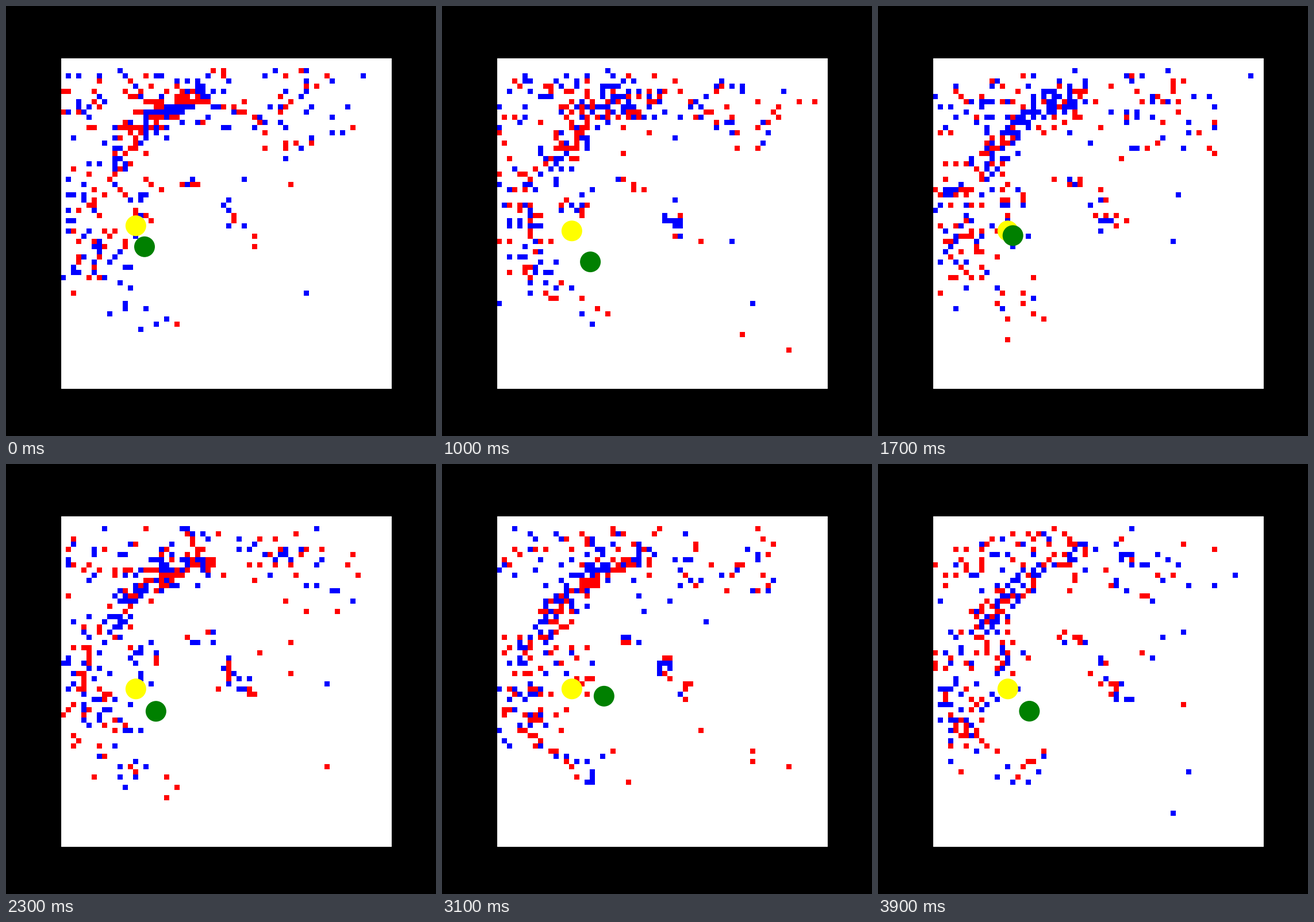
A matplotlib script that plays this animation: 748x748 px, repeating every 4000 ms.

```python
import numpy as np
import matplotlib.pyplot as plt
from matplotlib.animation import FuncAnimation
from matplotlib.patches import Circle

GRID = 64
TOP_ROW, LAST_ROW = 2, 61
STEPS = 40
WHITE, RED, BLUE = (255, 255, 255), (255, 0, 0), (0, 0, 255)


def arc(start, end):
    """Piece of the rounded outline, angles in degrees left of the top."""
    a = np.radians(np.linspace(start, end, 12))
    return np.column_stack([29 - 19 * np.sin(a), 24 - 16 * np.cos(a)])


# Path of (col, row) points, spread, mean event count, growth over the loop
BANDS = [
    (arc(0, 52), 1.7, 84, -0.25),
    (arc(52, 85), 1.7, 40, 0.2),
    ([(1, 9), (12, 7), (25, 4)], 3.6, 52, -0.1),
    ([(6, 22), (3, 30), (6, 38), (8, 42)], 3.6, 78, 0.1),
    ([(30, 8), (43, 9), (51, 11)], 4.2, 48, -0.3),
    ([(32, 27), (32, 31), (35, 31), (36, 35)], 0.8, 15, 0.2),
    ([(23, 23), (29, 24)], 0.8, 7, 0.1),
    ([(12, 28), (17, 26), (16, 34)], 1.2, 14, 0.1),
    ([(13, 46), (20, 51)], 2.5, 11, 0.5),
    ([(20, 20), (46, 26), (48, 56)], 5.0, 6, 0.0),
]

# Way points of the wandering ball: step, col, row
WAY = np.array([
    (0, 15.68, 36.06), (6, 16.60, 38.70), (13, 18.32, 39.20), (17, 14.98, 33.90),
    (23, 17.89, 37.33), (31, 20.22, 34.40), (39, 18.17, 37.30),
])


def sample_band(rng, path, spread, n):
    """Scatter n cells around a path, folded back at the top and left."""
    path = np.asarray(path, dtype=float)
    knots = np.arange(len(path))
    u = rng.uniform(0, knots[-1], n)
    col = np.interp(u, knots, path[:, 0]) + rng.normal(0, spread, n)
    row = np.interp(u, knots, path[:, 1]) + rng.normal(0, spread, n)
    col = np.abs(np.rint(col)).clip(0, GRID - 1)
    row = (TOP_ROW + np.abs(np.rint(row) - TOP_ROW)).clip(TOP_ROW, LAST_ROW)
    return row.astype(int), col.astype(int)


def event_image(step):
    rng = np.random.default_rng(100 + step)
    img = np.full((GRID, GRID, 3), WHITE, dtype=np.uint8)
    phase = 2 * step / (STEPS - 1) - 1
    for path, spread, count, growth in BANDS:
        n = round(count * (1 + growth * phase))
        rows, cols = sample_band(rng, path, spread, n)
        is_red = rng.random(n) < 0.47
        img[rows, cols] = np.where(is_red[:, None], RED, BLUE)
    return img


def ball_at(step):
    return [np.interp(step, WAY[:, 0], WAY[:, k]) for k in (1, 2)]


fig = plt.figure(figsize=(7.48, 7.48), dpi=100, facecolor="black")
ax = fig.add_subplot(xticks=[], yticks=[])
screen = ax.imshow(event_image(0), interpolation="nearest")
ax.set(xticks=[], yticks=[])
marker = ax.add_patch(Circle((14, 32), 2, fc="yellow", lw=0))
ball = ax.add_patch(Circle(ball_at(0), 2, fc="green", lw=0))


def update(step):
    screen.set_data(event_image(step))
    marker.center = (14, 32 if step < 10 else 33)
    ball.center = ball_at(step)
    return screen, marker, ball


anim = FuncAnimation(fig, update, frames=STEPS, interval=100, repeat=True)
plt.show()
```
